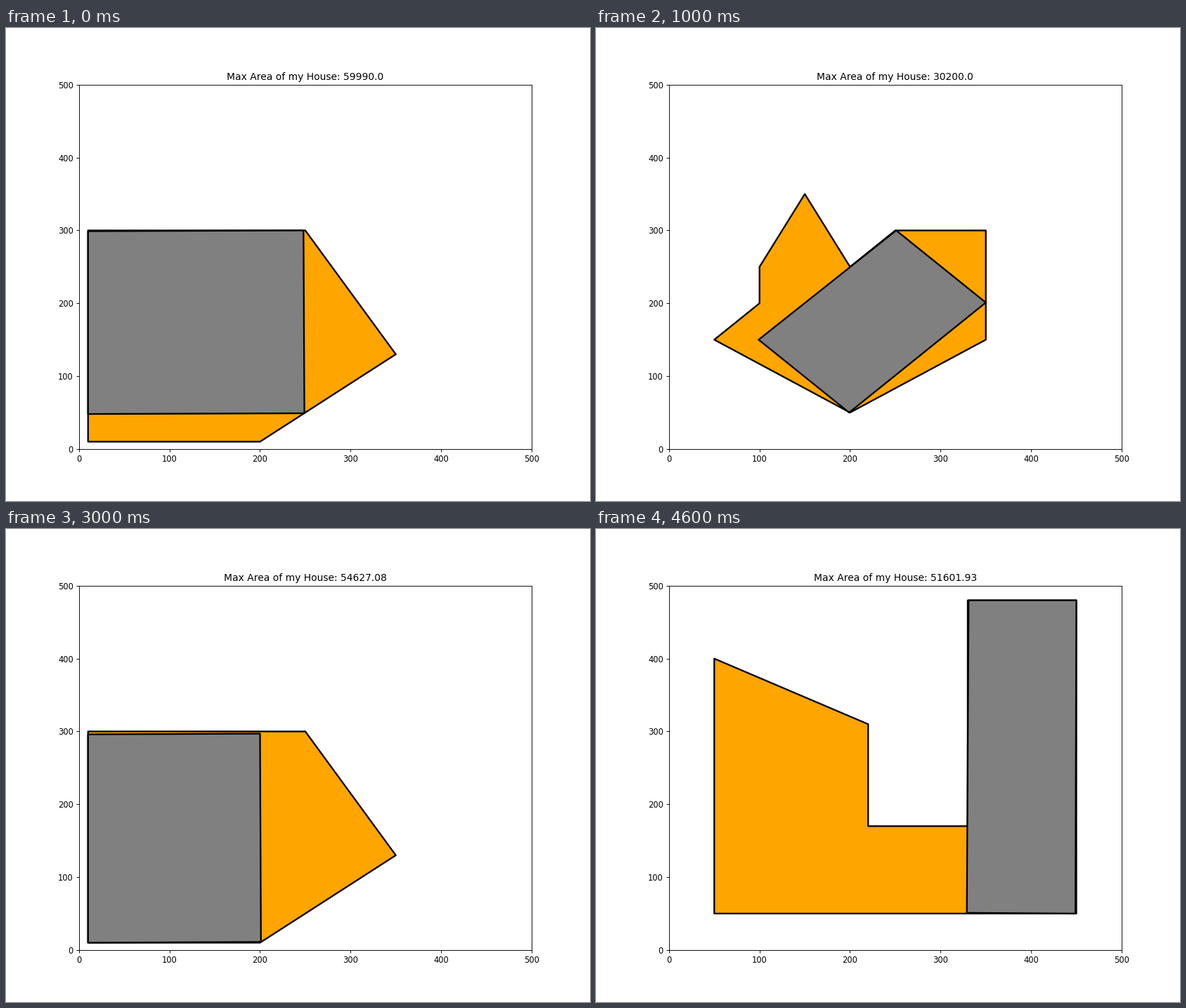
Recreate the animation shown at these times as a matplotlib script. Size 831x674 px, loop 5000 ms.

```python
import numpy as np
import matplotlib.pyplot as plt
from matplotlib.animation import FuncAnimation
from matplotlib.patches import Polygon

WIDTH, HEIGHT, DPI = 831, 674, 83
STEP_MS = 1000

# Plots of land, each on its own grid
ARROW = 10 * np.array([(1, 1), (20, 1), (35, 13), (25, 30), (1, 30)])
CROWN = 50 * np.array([(1, 3), (4, 1), (7, 3), (7, 6), (5, 6),
                       (4, 5), (3, 7), (2, 5), (2, 4)])
HOOK = 10 * np.array([(5, 5), (45, 5), (45, 48), (33, 48),
                      (33, 17), (22, 17), (22, 31), (5, 40)])

# Land, first corner of the house, its base and its side
SCENES = [
    (ARROW, (10, 48), (239, 1), (-1, 251)),
    (CROWN, (99, 150), (100, -100), (151, 151)),
    (HOOK, (50, 51), (170, -1), (0, 260)),
    (ARROW, (10, 10), (191, 1), (-1, 286)),
    (HOOK, (329, 51), (120, -1), (1, 430)),
]


def house_corners(corner, base, side):
    a, u, v = map(np.array, (corner, base, side))
    # The last corner is nudged one unit so that it stays on the land
    nudge = (1, min(np.sign(u[1]), 0))
    return [a, a + u, a + u + v, a + v + nudge]


def add_shape(ax, color):
    shape = Polygon(ARROW, facecolor=color, edgecolor="black",
                    linewidth=2, joinstyle="round")
    return ax.add_patch(shape)


fig, ax = plt.subplots(figsize=(WIDTH / DPI, HEIGHT / DPI), dpi=DPI)
ax.set(xlim=(0, 500), ylim=(0, 500))
land_patch = add_shape(ax, "orange")
house_patch = add_shape(ax, "gray")
title = ax.set_title("")


def update(i):
    land, corner, base, side = SCENES[i]
    area = round(float(np.hypot(*base) * np.hypot(*side)), 2)
    land_patch.set_xy(land)
    house_patch.set_xy(house_corners(corner, base, side))
    title.set_text(f"Max Area of my House: {area}")
    return land_patch, house_patch, title


anim = FuncAnimation(fig, update, frames=len(SCENES), interval=STEP_MS,
                     repeat=True, repeat_delay=0, blit=False)
plt.show()
```
